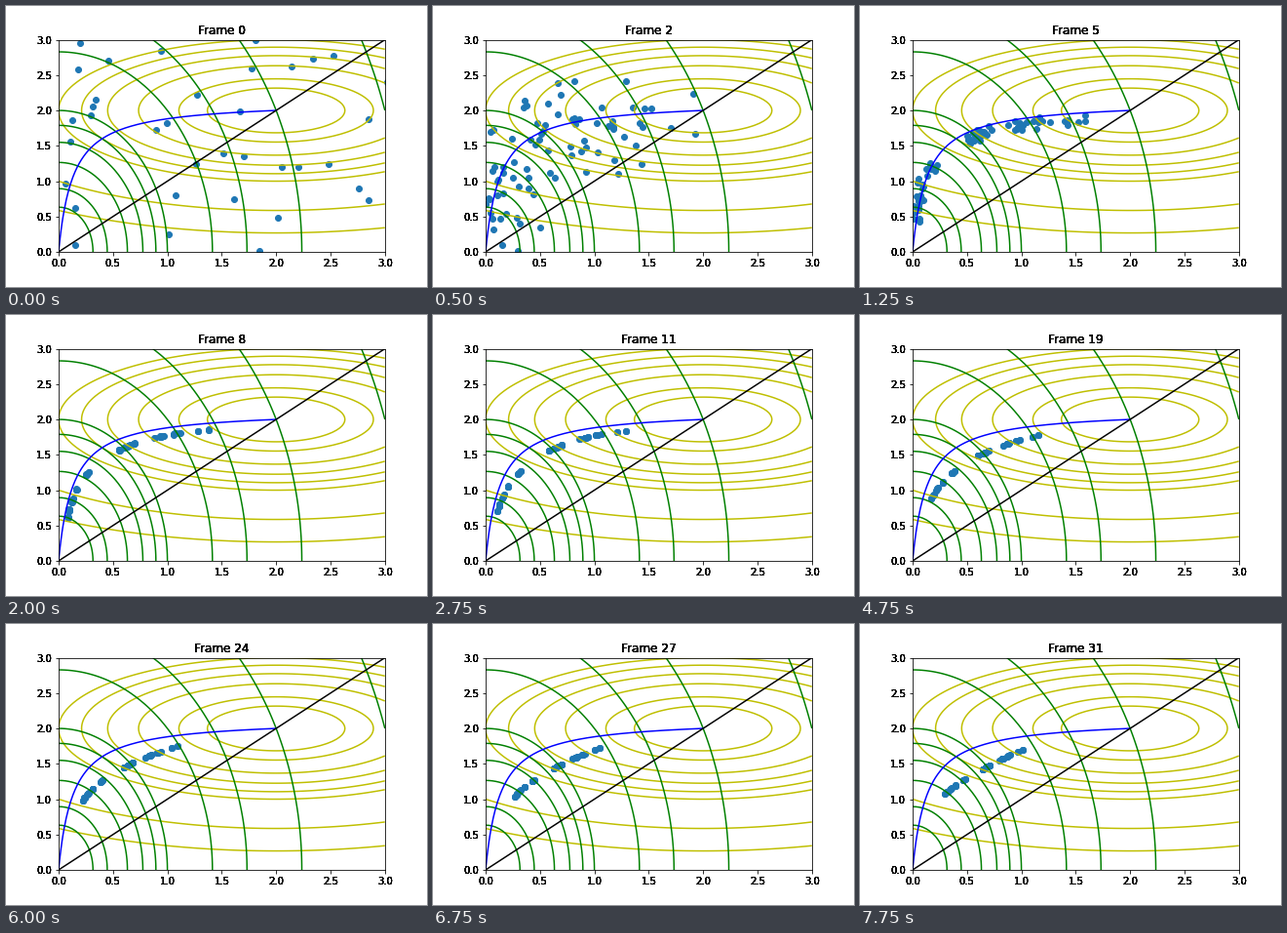
A matplotlib script for the animation above (8000 ms loop, 432x288 px).

```python
import numpy as np
import matplotlib.pyplot as plt
from matplotlib.animation import FuncAnimation

FRAMES, INTERVAL = 32, 250
COUNT, PARENTS = 80, 30
STROKES = 8  # repeated text drawing gives hard, heavy lettering

plt.rcParams.update({"font.family": "DejaVu Sans", "font.size": 10})

# Low end, control point and high end of the swarm's arc at key generations.
ARCS = {
    5: [(0.05, 0.47), (0.00, 1.81), (1.54, 1.88)],
    11: [(0.11, 0.70), (0.28, 1.68), (1.29, 1.84)],
    19: [(0.17, 0.88), (0.39, 1.51), (1.16, 1.78)],
    24: [(0.22, 0.98), (0.41, 1.42), (1.09, 1.75)],
    31: [(0.30, 1.08), (0.52, 1.37), (1.01, 1.70)],
}
KEYS = list(ARCS)

rng = np.random.default_rng(7)
start = rng.uniform(0, 5, (100, 2))
parents = np.r_[0, 1, rng.random(PARENTS - 2)]
place = np.resize(parents, COUNT)[:, None]
noise = rng.normal(0, (1, 1.5), (COUNT, 2))


def arc_at(n):
    """Arc points for generation n, easing out between the keys."""
    n = max(n, KEYS[0])
    i = min(np.searchsorted(KEYS, n, side="right"), len(KEYS) - 1)
    a, b = KEYS[i - 1], KEYS[i]
    w = 1 - (1 - (n - a) / (b - a)) ** 1.5
    return np.array(ARCS[a]) * (1 - w) + np.array(ARCS[b]) * w


def swarm(n):
    """Random start, then scatter that halves each generation."""
    if n == 0:
        return start
    low, bend, high = arc_at(n)
    t = place
    home = (1 - t) ** 2 * low + 2 * t * (1 - t) * bend + t ** 2 * high
    return np.abs(home + noise * 0.5 ** n)


def make_heavy(text):
    draw = text.draw

    def draw_often(renderer):
        for _ in range(STROKES):
            draw(renderer)

    text.draw = draw_often


fig = plt.figure(figsize=(6, 4), dpi=72, facecolor="white")
ax = fig.add_axes([0.125, 0.125, 0.775, 0.755])

grid = np.linspace(0, 3, 100)
X, Y = np.meshgrid(grid, grid)
levels = [0.1, 0.2, 0.4, 0.6, 0.8, 1, 2, 3, 5, 10]
ax.contour(X, Y, (X - 2) ** 2 / 4 + (Y - 2) ** 2, levels, colors="y")
ax.contour(X, Y, X ** 2 + Y ** 2 / 4, levels, colors="g")
front = np.linspace(0, 2, 200)
ax.plot(front, 32 * front / (2 + 15 * front), "b")
ax.plot([0, 3], [0, 3], "k")
dots = ax.scatter([], [], color="C0")

ticks = np.arange(0, 3.1, 0.5)
ax.set(xlim=(0, 3), ylim=(0, 3), xticks=ticks, yticks=ticks)
for label in [ax.title, *ax.get_xticklabels(), *ax.get_yticklabels()]:
    make_heavy(label)


def update(n):
    dots.set_offsets(swarm(n))
    ax.set_title(f"Frame {n}")


anim = FuncAnimation(fig, update, frames=FRAMES, interval=INTERVAL,
                     init_func=lambda: None, repeat=True, repeat_delay=0)
plt.show()
```
